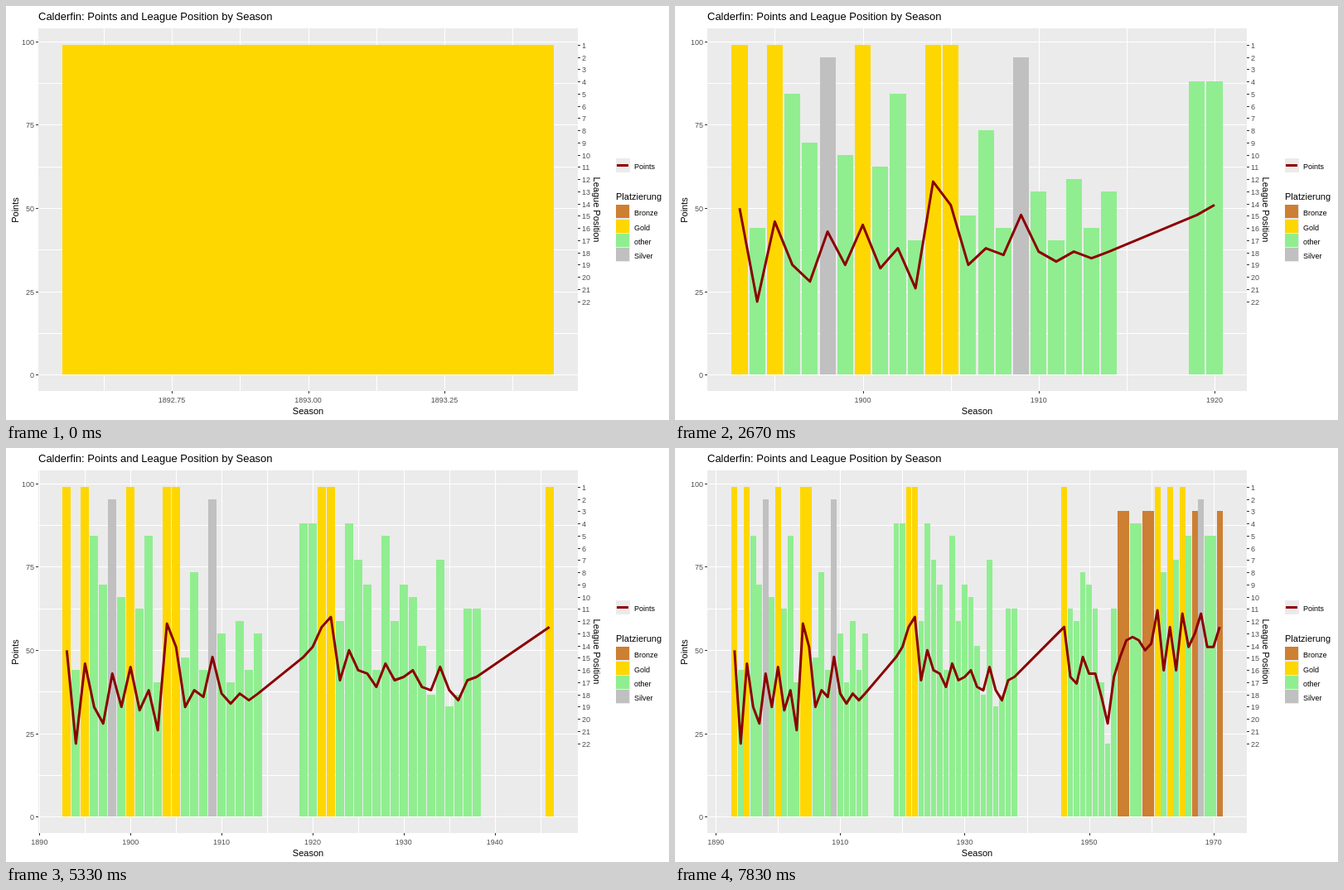
An HTML page for the animation above (8 s loop, 800 by 500 pixels).

```html
<!DOCTYPE html>
<html lang="en">
<head>
<meta charset="utf-8">
<title>Points and League Position</title>
<style>
  html, body { margin: 0; width: 100%; height: 100%; overflow: hidden; background: #fff; }
  svg { display: block; width: 800px; height: 500px; font: 9px "Liberation Sans", Arial, sans-serif; }
  rect { shape-rendering: crispEdges; }
  .tick { fill: #4d4d4d; }
  .title { font-size: 11px; }
  .middle { text-anchor: middle; }
  .end { text-anchor: end; }
  .points { fill: none; stroke: #8b0000; stroke-width: 3; stroke-linejoin: round; }
</style>
</head>
<body>
<svg viewBox="0 0 800 500">
  <g id="back"></g>
  <g id="chart"></g>
  <g id="front"></g>
</svg>
<script>
const LOOP = 8000, FPS = 6, LAST_STEP = 47;
const STEPS_PER_YEAR = 79 / 130;
const FIRST = 1893;
const PANEL = { left: 39, right: 690, top: 27, bottom: 465 };
const PLOT_X = 68.4, PLOT_W = 592.2;
const COLORS = { Bronze: '#cd7f32', Gold: '#ffd700', other: '#90ee90', Silver: '#c0c0c0' };
const MEDALS = ['', 'Gold', 'Silver', 'Bronze'];

const positions = [
  1, 16, 1, 5, 9, 2, 10, 1, 11, 5, 17, 1, 1, 15, 8, 16, 2, 13, 17, 12, 16, 13,
  4, 4, 1, 1, 12, 4, 7, 9, 16, 5, 12, 9, 10, 14, 18, 7, 19, 18, 11, 11,
  1, 11, 12, 8, 9, 11, 17, 22, 11, 3, 3, 4, 4, 3, 3, 1, 8, 1, 7, 1, 5, 3, 2, 5, 5, 3];
const points = [
  50, 22, 46, 33, 28, 43, 33, 45, 32, 38, 26, 58, 51, 33, 38, 36, 48, 37, 34, 37, 35, 37,
  48, 51, 57, 60, 41, 50, 44, 43, 39, 46, 41, 42, 44, 39, 38, 45, 38, 35, 41, 42,
  57, 42, 40, 48, 43, 43, 36, 28, 42, 48, 53, 54, 53, 50, 52, 62, 44, 57, 44, 61, 51, 55, 61, 51, 51, 57];

// No league was played in 1915-1918 and 1939-1945.
const seasons = points.map((value, i) => {
  const year = FIRST + i + (i > 21 ? 4 : 0) + (i > 41 ? 7 : 0);
  return { year, value, position: positions[i], step: Math.round((year - FIRST) * STEPS_PER_YEAR) };
});

const toY = v => 445.1 - 4.022 * v;
const rankValue = p => 99 * (28 - p) / 27;

const rect = (x, y, w, h, fill) => `<rect x="${x}" y="${y}" width="${w}" height="${h}" fill="${fill}"/>`;
const text = (x, y, s, cls = '', more = '') => `<text x="${x}" y="${y}" class="${cls}" ${more}>${s}</text>`;
const turned = (x, y, s, angle) =>
  text(0, 0, s, 'title middle', `transform="translate(${x} ${y}) rotate(${angle})"`);

// Axis breaks after the extended Wilkinson labelling algorithm.
function axisBreaks(lo, hi) {
  const nice = [1, 5, 2, 2.5, 4, 3], wanted = 5, range = hi - lo;
  let best = { score: -2 };
  for (let j = 1; j <= 4; j++) nice.forEach((q, i) => {
    const simplicity = 1 - i / (nice.length - 1) - j;
    for (let count = 2; count <= 12; count++) for (let z = -2; z <= 2; z++) {
      const step = j * q * 10 ** z, span = step * (count - 1);
      const from = (Math.floor(hi / step) - count + 1) * j;
      const to = Math.ceil(lo / step) * j;
      for (let s = from; s <= to; s++) {
        const a = s * step / j, b = a + span;
        const coverage = 1 - 0.5 * ((hi - b) ** 2 + (lo - a) ** 2) / (0.1 * range) ** 2;
        const ratio = (count - 1) / span * (Math.max(b, hi) - Math.min(a, lo)) / (wanted - 1);
        const density = 2 - Math.max(ratio, 1 / ratio);
        const score = 0.25 * simplicity + 0.2 * coverage + 0.5 * density + 0.05;
        if (score > best.score) best = { score, start: a, step, count };
      }
    }
  });
  return best;
}

function reveal(step) {
  const shown = seasons.filter(s => s.step <= step);
  const path = shown.slice();
  const last = shown[shown.length - 1], next = seasons[shown.length];
  if (next && last.step < step) {
    const u = (step - last.step) / (next.step - last.step);
    path.push({
      year: last.year + u * (next.year - last.year),
      value: last.value + u * (next.value - last.value)
    });
  }
  return { shown, path };
}

function drawChart(step) {
  const { shown, path } = reveal(step);
  const lo = FIRST - 0.45;
  const hi = Math.max(shown[shown.length - 1].year + 0.45, path[path.length - 1].year);
  const pad = (hi - lo) * 0.05;
  const toX = year => PLOT_X + (year - lo) / (hi - lo) * PLOT_W;
  const visible = year => year >= lo - pad && year <= hi + pad;

  const axis = axisBreaks(lo - pad, hi + pad);
  const majors = [], lines = [];
  for (let i = -1; i <= 2 * axis.count - 1; i++) {
    const year = axis.start + i * axis.step / 2;
    if (!visible(year)) continue;
    lines.push(year);
    if (i % 2 === 0) majors.push(year);
  }
  const whole = (v, n) => Math.abs(v * 10 ** n - Math.round(v * 10 ** n)) < 1e-6;
  const digits = [0, 1, 2].find(n => majors.every(v => whole(v, n))) ?? 2;

  let out = '';
  for (const year of lines)
    out += rect(Math.round(toX(year)), PANEL.top, 1, PANEL.bottom - PANEL.top, '#fff');
  for (const { year, position } of shown) {
    const left = Math.round(toX(year - 0.45)), right = Math.round(toX(year + 0.45));
    const top = Math.round(toY(rankValue(position)));
    out += rect(left, top, right - left, 445 - top, COLORS[MEDALS[position] || 'other']);
  }
  if (path.length > 1) {
    const corners = path.map(p => `${toX(p.year).toFixed(2)},${(toY(p.value) + 0.3).toFixed(2)}`);
    out += `<polyline class="points" points="${corners.join(' ')}"/>`;
  }
  for (const year of majors) {
    out += rect(Math.round(toX(year)), PANEL.bottom, 1, 3, '#333');
    out += text(toX(year).toFixed(2), 479, year.toFixed(digits), 'tick middle');
  }
  document.getElementById('chart').innerHTML = out;
}

function drawBack() {
  const width = PANEL.right - PANEL.left;
  let out = rect(PANEL.left, PANEL.top, width, PANEL.bottom - PANEL.top, '#ebebeb');
  for (let v = 0; v <= 100; v += 12.5)
    out += rect(PANEL.left, Math.round(toY(v)), width, 1, '#fff');
  document.getElementById('back').innerHTML = out;
}

function drawFront() {
  let out = text(39, 17, 'Calderfin: Points and League Position by Season', '', 'font-size="13"');
  for (let v = 0; v <= 100; v += 25) {
    out += rect(36, Math.round(toY(v)), 3, 1, '#333');
    out += text(34, Math.round(toY(v)) + 4, v, 'tick end');
  }
  for (let p = 1; p <= 22; p++) {
    const y = Math.round(toY(rankValue(p)));
    out += rect(PANEL.right, y, 3, 1, '#333') + text(695, y + 4, p, 'tick');
  }
  out += text(364.5, 493, 'Season', 'title middle');
  out += turned(15, 246.5, 'Points', -90) + turned(708.5, 246, 'League Position', 90);

  out += rect(736, 184, 17, 17, '#ebebeb') + rect(737, 191, 14, 3, '#8b0000');
  out += text(758, 197, 'Points');
  out += text(736, 234, 'Platzierung', 'title');
  out += rect(736, 240, 17, 69, '#ebebeb');
  Object.keys(COLORS).forEach((name, i) => {
    const y = Math.round(240.3 + 17.28 * i);
    out += rect(736, y, 16, 16, COLORS[name]) + text(758, y + 13, name);
  });
  document.getElementById('front').innerHTML = out;
}

let current = -1;
function tick() {
  const t = performance.now() % LOOP;
  const step = Math.min(LAST_STEP, Math.floor((t + 4) * FPS / 1000));
  if (step !== current) drawChart(current = step);
  requestAnimationFrame(tick);
}

drawBack();
drawFront();
tick();
</script>
</body>
</html>
```
